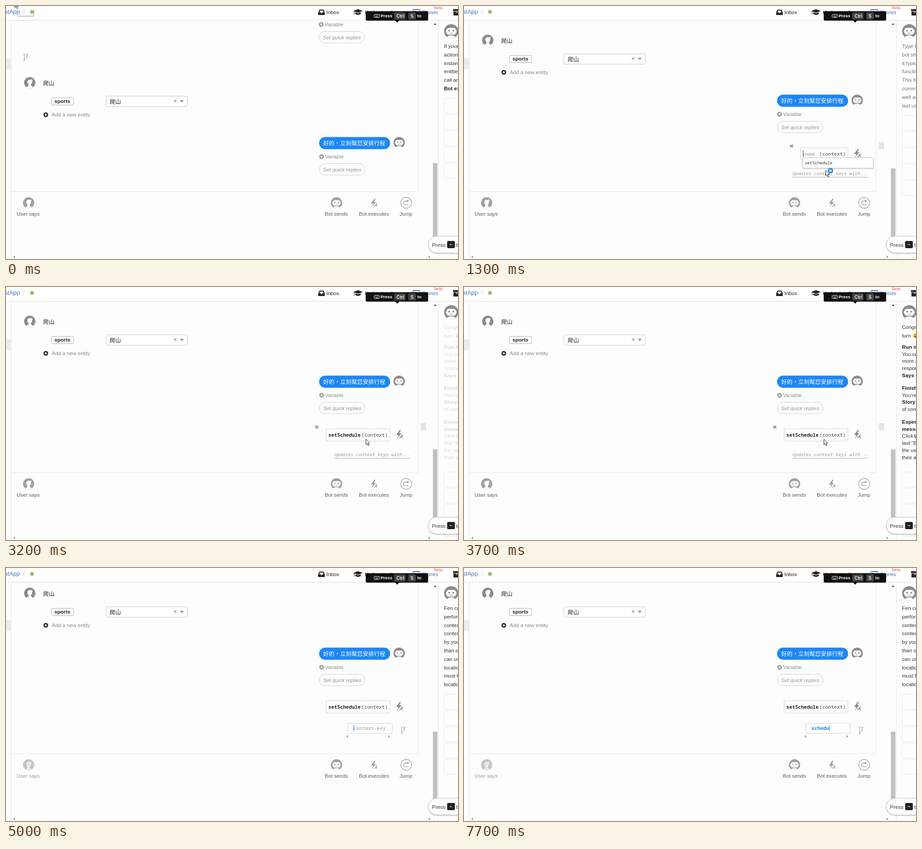
An HTML page with a canvas that plays this animation: 999 by 561 pixels, repeating every 8000 ms.

```html
<!DOCTYPE html>
<html lang="en">
<head>
<meta charset="utf-8">
<title>Chat story editor</title>
<style>
  html, body { margin: 0; width: 100%; height: 100%; overflow: hidden; background: #fdfdfd; }
  canvas { display: block; width: 100vw; height: 100vh; }
</style>
</head>
<body>
<canvas id="stage" width="999" height="561"></canvas>
<script>
const ctx = document.getElementById('stage').getContext('2d');
const LOOP = 8000, STEP = 100;
const SANS = '"Liberation Sans", sans-serif';
const MONO = '"Noto Sans Mono", monospace';
const CJK = '"Noto Sans CJK TC", "Noto Sans CJK", sans-serif';
const BLUE = '#1d87f5', GRAY = '#8c8c8c', BG = '#fdfdfd';

// Side panel texts; a leading * marks a bold line
const tips = [
  { at: -1000, fade: 1, top: 205, lines: ['If your b', 'action,', 'instanc', 'entities', 'call an', '*Bot exe'] },
  { at: 900, fade: 600, top: 243, lines: ['Type th', 'bot sho', 'it typica', 'function', 'This fun', 'current', 'well as t', 'last use'] },
  { at: 3100, fade: 600, top: 410, lines: ['Congra', 'turn'], smile: true, blocks: [
    [137, '*Run mo', 'You can', 'more ac', 'respons', '*Says or'],
    [228, '*Finish', "You're d", '*Story', 'of conv'],
    [303, '*Expect', '*messag', 'Click', 'last "Bo', 'the use', 'their an']] },
  { at: 4200, fade: 800, top: 280, lines: ['Fen can', 'perform', 'context', 'context', 'by your', 'than on', 'can use', 'location', 'must ha', 'location'] }
];
const typed = [[6100, 's'], [6300, 'sc'], [6600, 'sch'], [7100, 'sche'], [7300, 'sched'], [7700, 'schedu']];
const moves = [[0, 19, -9], [700, 811, 442], [900, 811, 442], [1500, 795, 337], [3900, 795, 337], [4200, 788, 371], [LOOP, 788, 371]];

function text(s, x, y, color = '#333', size = 11.5, style = '', family = SANS) {
  ctx.font = `${style} ${size}px ${family}`;
  ctx.fillStyle = color;
  ctx.fillText(s, x, y);
}

function box(x, y, w, h, r, fill, stroke) {
  ctx.beginPath();
  ctx.roundRect(x, y, w, h, r);
  if (fill) { ctx.fillStyle = fill; ctx.fill(); }
  if (stroke) { ctx.strokeStyle = stroke; ctx.lineWidth = 1; ctx.stroke(); }
}

function rect(x, y, w, h, color) {
  ctx.fillStyle = color;
  ctx.fillRect(x, y, w, h);
}

function oval(x, y, rx, ry, color) {
  ctx.beginPath();
  ctx.ellipse(x, y, rx, ry, 0, 0, Math.PI * 2);
  ctx.fillStyle = color;
  ctx.fill();
}

function disc(x, y, r, color) {
  oval(x, y, r, r, color);
}

function poly(points, fill, stroke, width = 1) {
  ctx.beginPath();
  points.forEach(([x, y]) => ctx.lineTo(x, y));
  if (fill) { ctx.closePath(); ctx.fillStyle = fill; ctx.fill(); }
  if (stroke) { ctx.strokeStyle = stroke; ctx.lineWidth = width; ctx.stroke(); }
}

function at(x, y, draw, scale = 1, alpha = 1) {
  ctx.save();
  ctx.translate(x, y);
  ctx.scale(scale, scale);
  ctx.globalAlpha *= alpha;
  draw();
  ctx.restore();
}

function clipDisc(color) {
  disc(0, 0, 12.5, color);
  ctx.clip();
}

function bot(color = GRAY) {
  clipDisc(color);
  oval(0, 13, 8.5, 5.8, BG);
  box(-9.3, -2.5, 18.6, 5, 2, BG);
  box(-8.3, -6, 16.6, 12, 4.5, BG);
  disc(-3.7, -1, 1.6, color);
  disc(3.7, -1, 1.6, color);
  ctx.beginPath();
  ctx.arc(0, 1.2, 2.4, 0.4, Math.PI - 0.4);
  ctx.strokeStyle = color;
  ctx.lineWidth = 0.9;
  ctx.stroke();
}

function person(color = GRAY) {
  clipDisc(color);
  oval(0, -1.3, 5.2, 5.8, BG);
  disc(4.2, -5.3, 2, BG);
  poly([[-2.5, 2], [2.5, 2], [3, 7], [6.5, 9.5], [6.5, 13], [-6.5, 13], [-6.5, 9.5], [-3, 7]], BG);
}

function bolt(color) {
  poly([[1, -10], [-7, 1.5], [-1.5, 1], [-5, 9.5], [5, -3], [0, -2.5], [4, -10]], color);
  poly([[1, 8.5], [6.5, 1], [7, 8.5]], null, color, 1.4);
  poly([[2.5, 6.2], [7, 6.2]], null, color, 1.2);
}

function branch() {
  const c = '#a5a5a5';
  poly([[-2.5, -5], [-2.5, 5]], null, c);
  poly([[-2, 4], [3, 1], [3, -2]], null, c);
  for (const [x, y] of [[-2.5, -6], [-2.5, 6.5], [3, -2.5]]) {
    disc(x, y, 1.7, c);
    disc(x, y, 0.8, BG);
  }
  poly([[1, -6.5], [6, -6.5]], null, c);
  poly([[3.5, -9], [3.5, -4]], null, c);
}

function plus(x, y, color) {
  disc(x, y, 5.2, color);
  rect(x - 3, y - 0.8, 6, 1.6, BG);
  rect(x - 0.8, y - 3, 1.6, 6, BG);
}

function cross(x, y, r, color, width) {
  poly([[x - r, y - r], [x + r, y + r]], null, color, width);
  poly([[x - r, y + r], [x + r, y - r]], null, color, width);
}

function sideArrow(x, y, dir, color = '#999') {
  poly([[x + 2 * dir, y], [x - 2 * dir, y - 3], [x - 2 * dir, y + 3]], color);
}

function replies(x, y) {
  plus(x + 5.5, y, '#999');
  text('Variable', x + 13, y + 4, '#8c8c8c');
  box(x + 0.5, y + 15.5, 101, 25.5, 12.7, BG, '#ccc');
  text('Set quick replies', x + 9, y + 33, '#949494', 11.5, 'italic');
}

function conversation(dy) {
  at(0, dy, () => {
    replies(691, 41);
    at(43, 114, branch);
    at(52.5, 170, () => person());
    text('爬山', 82, 176, '#222', 12.5, '300', CJK);
    box(100.5, 203.5, 49, 16, 2.5, '#fff', '#aaa');
    text('sports', 107, 215, '#222', 11.5, 'bold');
    box(221, 200, 179.5, 23, 2.5, '#fff', '#c4c4c4');
    text('爬山', 229, 216.5, '#222', 12.5, '300', CJK);
    cross(374, 210.5, 2.8, '#888', 1.2);
    poly([[384, 209], [393, 209], [388.5, 213.5]], '#888');
    plus(88, 241, '#222');
    text('Add a new entity', 101, 245, '#888');
    box(692, 290.5, 157, 27, 13.5, BLUE);
    text('好的，立刻幫您安排行程', 701, 309, '#fff', 12.5, '300', CJK);
    at(869, 303, () => bot());
    replies(692, 334);
  });
}

function caret(x, y) {
  rect(x, y, 1, 14, BLUE);
}

function actionRow(t, dy) {
  const chosen = t >= 3100, keyed = t >= 4200;
  const left = chosen ? 707.5 : 744.5;
  at(0, dy, () => {
    box(left, 408.5, 848.5 - left, 27, 0, '#fff', '#d0d0d0');
    text('(context)', 785.5, 426, '#444', 10.8, '', MONO);
    at(869, 421, () => bolt(GRAY));
    if (chosen) {
      text('setSchedule', 712.5, 426, '#222', 10.8, 'bold', MONO);
    } else {
      const name = t >= 2000 ? 'se' : t >= 1900 ? 's' : '';
      if (name) text(name, 749.5, 426, '#222', 10.8, 'bold', MONO);
      else text('name', 749.5, 426, '#bbb', 10.8, 'bold', MONO);
      if (t < 2500) rect(749 + name.length * 6.5, 414, 1, 15, '#333');
    }
    if (!keyed) {
      cross(chosen ? 687 : 724, 404.5, 3, '#8a8a8a', 2.2);
      poly([[917, 396], [928.5, 396], [928.5, 414], [922.7, 410], [917, 414]], '#e4e4e4');
      text('Updates context keys with...', 725, 468.5, '#999', 10, 'italic', MONO);
      rect(725, 473, 169, 1, '#aaa');
    }
  });
  if (keyed) keyField(t);
  else if (!chosen && t >= 1200) suggestions(t >= 2900);
}

function suggestions(active) {
  ctx.save();
  ctx.shadowColor = 'rgba(0,0,0,.25)';
  ctx.shadowBlur = 3;
  ctx.shadowOffsetY = 1;
  box(748.5, 336.5, 156, 23, 1.5, '#fff');
  ctx.restore();
  box(748.5, 336.5, 156, 23, 1.5, null, '#c0c0c0');
  if (active) rect(749, 341, 155, 14, '#eee');
  text('setSchedule', 753, 351, '#333', 9.3, '', MONO);
}

function keyField(t) {
  box(755.5, 344.5, 98, 22, 0, '#fff', '#d4d4d4');
  const word = typed.reduce((last, [when, s]) => t >= when ? s : last, '');
  if (word) text(word, 768, 359, BLUE, 10.8, 'bold', MONO);
  else text('context-key', 768, 359, '#bbb', 10.8, 'bold', MONO);
  if (t < 5500 || word) caret(768 + Math.round(word.length * 6.5), 348);
  sideArrow(754, 373.5, -1);
  sideArrow(847, 373.5, 1);
  at(877, 360, branch);
}

function toolbar(dim, hover) {
  const c = '#a2a2a2', label = '#5c5c5c';
  at(0, 0, () => {
    at(50, 436.5, () => person(c));
    text('User says', 23.5, 465, label);
  }, 1, dim ? 0.62 : 1);
  at(730.5, 436.5, () => bot(c));
  text('Bot sends', 704.5, 465, label);
  at(813, 437, () => bolt(hover ? '#777' : c), 0.95);
  text('Bot executes', 780, 465, hover ? '#222' : label);
  at(884.5, 436.5, () => {
    ctx.strokeStyle = c;
    ctx.lineWidth = 1.3;
    ctx.beginPath();
    ctx.arc(0, 0, 12, 0, Math.PI * 2);
    ctx.stroke();
    ctx.lineWidth = 1.5;
    ctx.beginPath();
    ctx.moveTo(5, 4);
    ctx.lineTo(-2, 4);
    ctx.arc(-2, 0, 4, Math.PI / 2, Math.PI * 1.5);
    ctx.lineTo(3, -4);
    ctx.stroke();
    poly([[2, -7], [6.5, -4], [2, -1]], c);
  });
  text('Jump', 870, 465, label);
}

function panelLine(s, y) {
  const bold = s[0] === '*';
  text(bold ? s.slice(1) : s, 968, y, bold ? '#222' : '#333', 11.5, bold ? 'bold' : '');
}

function sidePanel(t) {
  const tip = tips.filter(p => t >= p.at).pop();
  rect(956, 32, 43, 529, BG);
  at(984, 56, () => bot(), 1.26);
  at(0, 0, () => {
    tip.lines.forEach((s, i) => panelLine(s, 93 + i * 18.8));
    for (const [y, ...lines] of tip.blocks || []) {
      lines.forEach((s, i) => panelLine(s, y + i * 15.7));
    }
    if (tip.smile) {
      text('U', 995, 334.5, '#222', 11.5, 'bold');
      disc(998.5, 108, 6, '#f6c944');
      disc(996.5, 106.5, 1, '#553311');
      rect(995, 109, 5, 2, '#553311');
    }
  }, 1, Math.min(1, (t - tip.at) / tip.fade));
  for (let i = 0; i < 5; i++) box(968, tip.top + i * 36, 60, 33, 4, null, '#e8e8e8');
}

function keycap(s, x, w) {
  box(x, 14, w, 16, 2.5, '#444');
  text(s, x + 5, 26, '#eee', 10, 'bold');
}

function header() {
  rect(0, 0, 999, 31, '#fff');
  rect(0, 31, 999, 1, '#dcdcdc');
  text('stApp', -3, 16.5, '#3f74b5', 13.2);
  text('/', 38, 16.5, '#ccc', 13.2);
  disc(57.5, 13, 4.3, '#8cc265');

  poly([[693, 8], [702, 8], [704.5, 14], [704.5, 20], [690, 20], [690, 14]], '#222');
  poly([[694.5, 10], [700.5, 10], [702, 14], [699, 14], [698, 16], [696.5, 16], [695.5, 14], [692.5, 14]], '#fff');
  text('Inbox', 708, 18, '#222');

  poly([[778, 7], [788.5, 11], [778, 15], [767.5, 11]], '#222');
  poly([[772, 14], [778, 16.3], [784, 14], [784, 18], [778, 20], [772, 18]], '#222');
  rect(769, 11, 1, 8, '#222');
  text('Understanding', 793, 18, '#222');

  box(899, 8, 16, 12, 1.5, null, '#3f74b5');
  rect(899, 7, 16, 2, '#3f74b5');
  rect(902, 11, 4, 4, '#3f74b5');
  text('Stories', 919.5, 18, '#3f74b5');
  text('beta', 946, 7, '#e05548', 9.6);
  rect(988, 7, 12, 4, '#222');
  rect(989, 12, 10, 9, '#222');
  rect(994, 13, 4, 1.5, '#fff');

  box(795, 11.5, 138, 21, 3, '#111');
  poly([[860, 32], [869, 32], [864.5, 37]], '#111');
  box(813.5, 18.5, 12, 7, 1, null, '#ddd');
  for (let i = 0; i < 4; i++) rect(815.5 + i * 2.4, 20, 1.3, 1.3, '#ddd');
  rect(816, 23, 7, 1.2, '#ddd');
  text('Press', 828, 25, '#fff', 9.5, 'bold');
  keycap('Ctrl', 858, 25);
  keycap('S', 889, 17);
  text('to', 909, 25, '#fff', 9.5, 'bold');
}

function hintPill() {
  ctx.save();
  ctx.shadowColor = 'rgba(0,0,0,.35)';
  ctx.shadowBlur = 3;
  ctx.shadowOffsetY = 1;
  box(933.5, 510.5, 120, 37, 18.5, '#fff');
  ctx.restore();
  box(933.5, 510.5, 120, 37, 18.5, null, '#c4c4c4');
  text('Press', 941.5, 534, '#333', 11.7);
  box(975, 521, 17, 16, 2.5, '#222');
  text('~', 980, 533, '#fff', 11, 'bold');
  text('to', 995, 534, '#333', 11.7);
}

function frameLines(thumbTop) {
  rect(0, 116, 11, 24, '#ececec');
  rect(11, 32, 1, 529, '#e6e6e6');
  rect(12, 411, 899, 1, '#e6e6e6');
  rect(910, 32, 1, 380, '#e6e6e6');
  rect(955, 32, 1, 529, '#e6e6e6');
  rect(943.5, thumbTop, 10, 540 - thumbTop, '#c1c1c1');
  poly([[945.5, 42], [951.5, 42], [948.5, 38]], '#555');
  sideArrow(18, 556.5, -1);
  sideArrow(936, 556.5, 1);
}

function pointerPos(t) {
  const i = moves.findIndex(m => t < m[0]);
  const [t0, x0, y0] = moves[i - 1], [t1, x1, y1] = moves[i];
  const p = (t - t0) / (t1 - t0), e = p * p * (3 - 2 * p);
  return [Math.round(x0 + (x1 - x0) * e), Math.round(y0 + (y1 - y0) * e)];
}

function arrow() {
  poly([[0.5, 0.5], [0.5, 12.5], [3.3, 10], [5.3, 14.8], [7.3, 14], [5.3, 9.3], [9, 9.3], [0.5, 0.5]], '#fff', '#222');
}

function hand() {
  ctx.beginPath();
  ctx.moveTo(-2, 1);
  ctx.quadraticCurveTo(-0.5, -1, 1, 1);
  ctx.lineTo(1, 6);
  ctx.lineTo(6, 7.5);
  ctx.quadraticCurveTo(7, 8, 6.7, 11);
  ctx.lineTo(5, 17);
  ctx.lineTo(-2, 17);
  ctx.lineTo(-6, 10.5);
  ctx.quadraticCurveTo(-5.5, 8, -2, 11);
  ctx.closePath();
  ctx.fillStyle = '#fff';
  ctx.fill();
  ctx.strokeStyle = '#222';
  ctx.lineWidth = 1.2;
  ctx.stroke();
  poly([[1, 6], [1, 9]], null, '#222');
  poly([[3.7, 7], [3.7, 9.5]], null, '#222');
}

function isHovering(t) {
  return t >= 700 && t < 1100;
}

function pointer(t) {
  if (t >= 4900) return;
  const [x, y] = pointerPos(t);
  at(x, y, isHovering(t) ? hand : arrow);
  if (t >= 1200 && t < 3100) {
    disc(x + 11, y + 1, 6, '#2d8ce8');
    disc(x + 11, y + 1, 2.6, '#fff');
  }
}

function linkHint() {
  rect(25, 22, 37, 1, '#888');
  rect(61, 10, 1, 13, '#999');
}

function draw(t) {
  const stage = t < 900 ? 0 : t < 4200 ? 1 : 2;
  const dy = [0, -94, -114][stage];
  rect(0, 0, 999, 561, BG);
  frameLines([348, 360, 363][stage]);
  conversation(dy);
  if (stage) actionRow(t, dy);
  toolbar(stage === 2, isHovering(t));
  sidePanel(t);
  header();
  hintPill();
  if (t < 100) linkHint();
  pointer(t);
}

function tick() {
  const t = performance.now() % LOOP;
  draw(Math.floor(t / STEP) * STEP);
  requestAnimationFrame(tick);
}
tick();
</script>
</body>
</html>
```
